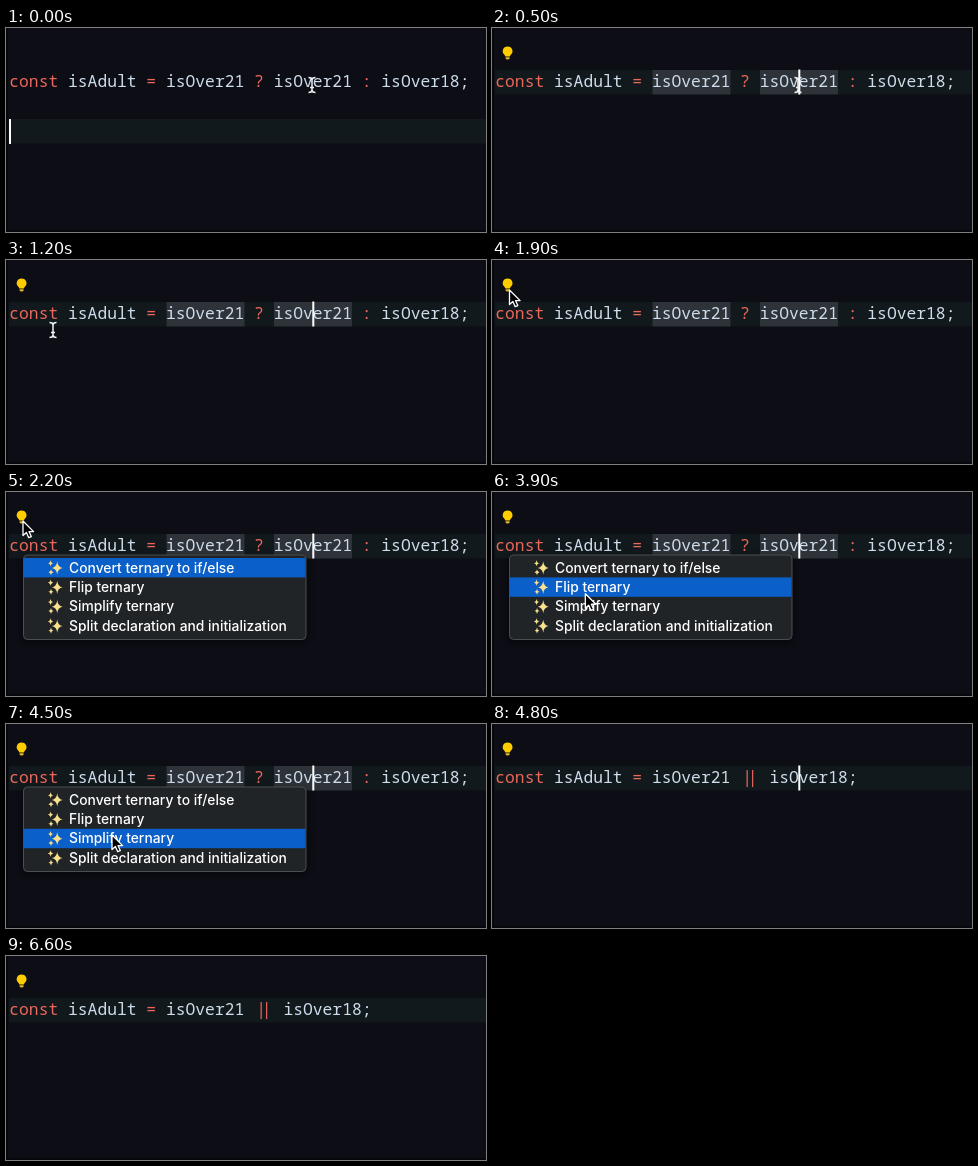
Write an HTML page that moves like this. It is 480 by 204 pixels and loops after 6700 ms.

```html
<!DOCTYPE html>
<html lang="en">
<head>
<meta charset="utf-8">
<title>Simplify ternary</title>
<style>
  html, body { margin: 0; width: 100%; height: 100%; overflow: hidden; background: #0c0d15; }
  svg { display: block; width: 480px; height: 204px; }
  .code text { font: 500 16.32px "Noto Sans Mono", "DejaVu Sans Mono", monospace; fill: #cddcea; font-variant-ligatures: none; }
  .code .op { fill: #ec675c; }
  .code .or { font-weight: 400; letter-spacing: -4.4px; }
  .menu text { font: 500 13.85px Inter, Roboto, sans-serif; fill: #fff; }
  .menu .box { filter: drop-shadow(0 2px 3px #0008); }
</style>
</head>
<body>
<svg viewBox="0 0 480 204">
  <defs>
    <path id="star" d="M0-1Q.1-.1 1 0Q.1.1 0 1Q-.1.1-1 0Q-.1-.1 0-1Z"/>
    <g id="sparkles" fill="#f8e08c">
      <use href="#star" transform="translate(51.2 .2) scale(5.4 6.6)"/>
      <use href="#star" transform="translate(44.6 -4.4) scale(2.9 3.4)"/>
      <use href="#star" transform="translate(45 4.6) scale(2.5 3)"/>
    </g>
  </defs>
  <rect width="480" height="204" fill="#0c0d15"/>
  <rect id="line" x="3" width="477" height="24.5" fill="#12191c"/>
  <path d="M0 0H2V202H480V204H0Z" fill="#07080c"/>
  <g id="words" fill="#2d3338">
    <rect x="160.5" y="42" width="78" height="24.5"/>
    <rect x="268" y="42" width="78" height="24.5"/>
  </g>
  <g id="before" class="code"></g>
  <g id="after" class="code"></g>
  <rect id="caret" width="2" height="25" fill="#fff"/>
  <g id="bulb" fill="#fc0">
    <path d="M15.6 18.4A4.8 4.8 0 0 1 18.6 27L17.8 28.4H13.4L12.6 27A4.8 4.8 0 0 1 15.6 18.4Z"/>
    <path d="M13.6 29.2H17.6V30.4Q17.6 31.4 15.6 31.4Q13.6 31.4 13.6 30.4Z" fill="#e0b92a"/>
  </g>
  <g id="menu" class="menu">
    <rect class="box" x="17.5" y="63" width="282.5" height="84.5" rx="4" fill="#212426" stroke="#4b4e51"/>
    <rect id="pick" x="18" width="281.5" height="19.4" fill="#0a5fc8"/>
  </g>
  <path id="beam" d="M-3.5-7.5Q0-7.5 0-5Q0-7.5 3.5-7.5M0-5V5M-3.5 7.5Q0 7.5 0 5Q0 7.5 3.5 7.5M-2 2.5H2"
    fill="none" stroke="#f2f2f2" stroke-width="1.5"/>
  <path id="arrow" d="M0 0V14.6L3.4 11.5L5.7 16.7L8.3 15.6L6 10.6H10.6Z"
    fill="#000" stroke="#fff" stroke-width="1.3" stroke-linejoin="round"/>
</svg>
<script>
const LOOP = 6700, STEP = 100, PITCH = 9.79, ROW = 19.4, MENU_TOP = 66;
const CLICK = 200, HINT = 500, ARROW = 1500, OPEN = 2200, APPLY = 4800;
const SVG = "http://www.w3.org/2000/svg";
const $ = id => document.getElementById(id);

// time, x, y
const path = [
  [0, 306, 57], [800, 306, 57], [900, 205, 98], [1000, 90, 93], [1200, 47, 70],
  [1400, 28, 48], [1500, 20, 38], [1800, 18, 31], [2000, 17, 29], [2600, 17, 29],
  [2900, 50, 70], [3200, 84, 94], [3800, 87, 97], [4100, 106, 111], [LOOP, 106, 111]
];

function add(parent, tag, attrs, text = "") {
  const el = document.createElementNS(SVG, tag);
  for (const key in attrs) el.setAttribute(key, attrs[key]);
  el.textContent = text;
  parent.append(el);
}

function addCode(parent, source) {
  for (const { 0: word, index } of source.matchAll(/\S+/g)) {
    const op = /^(const|[=?:|]+)$/.test(word);
    const or = word === "||";
    add(parent, "text", {
      x: 3.3 + index * PITCH + (or ? 2.2 : 0), y: 59,
      class: (op ? "op" : "") + (or ? " or" : "")
    }, word);
  }
}

addCode($("before"), "const isAdult = isOver21 ? isOver21 : isOver18;");
addCode($("after"), "const isAdult = isOver21 || isOver18;");

["Convert ternary to if/else", "Flip ternary", "Simplify ternary",
  "Split declaration and initialization"].forEach((label, i) => {
  const mid = MENU_TOP + ROW * (i + 0.5);
  add($("menu"), "use", { href: "#sparkles", y: mid });
  add($("menu"), "text", { x: 63, y: mid + 4.9 }, label);
});

function pointerAt(t) {
  const i = path.findIndex(p => p[0] > t);
  const [t0, x0, y0] = path[i - 1], [t1, x1, y1] = path[i];
  const k = (t - t0) / (t1 - t0);
  return [x0 + (x1 - x0) * k, y0 + (y1 - y0) * k];
}

function caretOn(t) {
  const blink = start => Math.floor((t - start) / 500) % 2 === 0;
  if (t < CLICK) return true;
  if (t < OPEN) return blink(CLICK);
  return t < APPLY || blink(APPLY);
}

const show = (id, on) => { $(id).style.display = on ? "" : "none"; };
const set = (id, attr, value) => $(id).setAttribute(attr, value);

function draw(ms) {
  let t = Math.floor(ms / STEP) * STEP;
  if (t % 1000 === STEP) t -= STEP; // one held step per second
  const clicked = t >= CLICK, done = t >= APPLY;
  const [x, y] = pointerAt(t);

  set("line", "y", clicked ? 42 : 91);
  set("caret", "x", clicked ? 306.3 : 3);
  set("caret", "y", clicked ? 41.5 : 91);
  show("caret", caretOn(t));
  show("words", t >= HINT && !done);
  show("bulb", t >= HINT);
  show("before", !done);
  show("after", done);

  show("menu", t >= OPEN && !done);
  const row = Math.max(0, Math.floor((y - MENU_TOP) / ROW));
  set("pick", "y", MENU_TOP + row * ROW);

  const at = `translate(${x} ${y})`;
  set("beam", "transform", at);
  set("arrow", "transform", at);
  show("beam", t < ARROW);
  show("arrow", t >= ARROW && !done);
}

const start = performance.now();
function tick(now) {
  draw(Math.max(0, now - start) % LOOP);
  requestAnimationFrame(tick);
}
draw(0);
requestAnimationFrame(tick);
</script>
</body>
</html>
```
